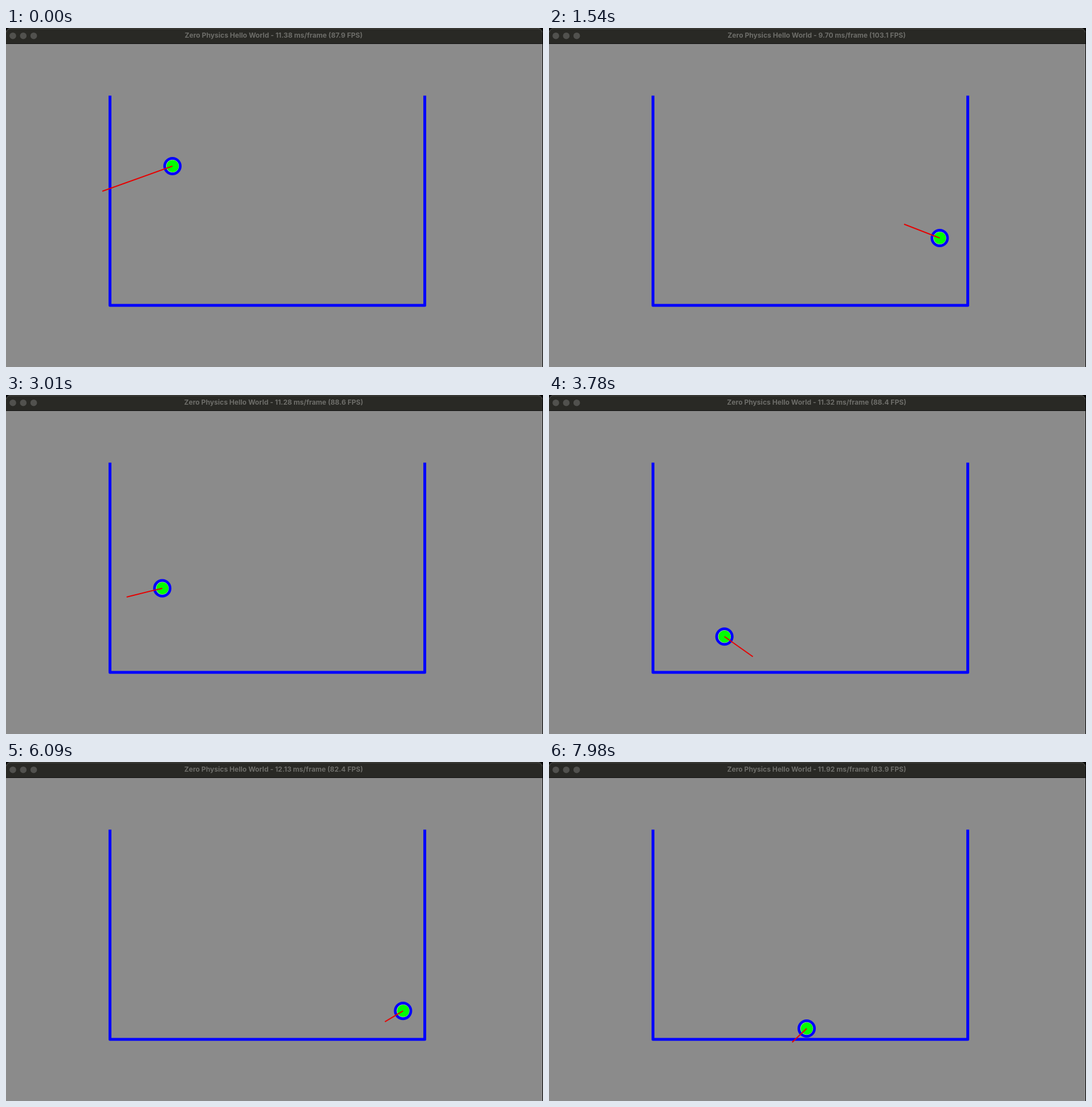
These frames come from a looping animation (942 by 594 pixels, 8 s). An HTML page:

```html
<!DOCTYPE html>
<html lang="en">
<head>
<meta charset="utf-8">
<title>Zero Physics</title>
<style>
  html, body { margin: 0; width: 100%; height: 100%; overflow: hidden; background: #000; }
  svg { display: block; width: 942px; height: 594px; }
  text { font: 700 12.1px Inter, sans-serif; fill: #6d6d69; }
</style>
</head>
<body>
<svg viewBox="0 0 942 594">
  <path d="M0 594V9Q0 0 9 0H932Q941 0 941 9V594Z" fill="#8b8b8b"/>
  <path d="M0 27V9Q0 0 9 0H932Q941 0 941 9V27Z" fill="#292925"/>
  <path d="M1 7Q2 1.5 9 1.5H932Q939 1.5 940 7" fill="none" stroke="#484845"/>
  <path d="M0 27.5H941" stroke="#10100f"/>
  <g fill="#51514e">
    <circle cx="12" cy="13.7" r="5.8"/>
    <circle cx="30.3" cy="13.7" r="5.8"/>
    <circle cx="48.6" cy="13.7" r="5.8"/>
  </g>
  <text id="title" x="469.5" y="17.4" text-anchor="middle"></text>
  <path d="M182.4 118.5V486H734.6V118.5" fill="none" stroke="#00f" stroke-width="5" stroke-linejoin="round"/>
  <g id="ball">
    <circle cx=".3" r="11" fill="#0f0" stroke="#b4d8b4" stroke-width=".8"/>
    <circle r="13.7" fill="none" stroke="#00f" stroke-width="4.7"/>
    <line id="velocity" stroke="#e60000" stroke-width="2"/>
  </g>
</svg>
<script>
const LOOP = 8000, STEP = 70;
const SPEED = 123, RESTITUTION = 0.798, GRAVITY = 6;

// Contacts with walls and floor: time, x, y. Free flight in between.
const contacts = [
  [0, 292, 242], [222, 189, 281], [960, 558, 467], [1427, 717, 381], [3275, 200, 361],
  [4072, 370, 472], [5950, 717, 425], [6380, 654, 467], [7980, 452, 467]
];

// Key readings of the frame timer: time, ms per frame.
const timings = [
  [0, 11.38], [910, 8.82], [2240, 9.264], [3780, 11.316], [4760, 10.43], [6090, 12.13], [7980, 11.92]
];

const byId = id => document.getElementById(id);
const title = byId("title"), ball = byId("ball"), velocity = byId("velocity");
const lerp = (a, b, s) => a + (b - a) * s;

function segmentAt(points, time) {
  const next = points.findIndex(p => p[0] > time);
  const i = (next < 0 ? points.length : next + 1) - 2;
  const from = points[Math.max(i, 0)], to = points[Math.max(i, 0) + 1];
  return { i, from, to, s: (time - from[0]) / (to[0] - from[0]) };
}

// Horizontal speed shrinks at every contact; gravity gives the arc between two of them.
function ballAt(time) {
  const { i, from: [, x0, y0], to: [, x1, y1], s } = segmentAt(contacts, time);
  const vx = Math.sign(x1 - x0) * SPEED * RESTITUTION ** i;
  const flight = (x1 - x0) / vx;
  return {
    x: lerp(x0, x1, s),
    y: lerp(y0, y1, s) - GRAVITY / 2 * flight ** 2 * s * (1 - s),
    vx,
    vy: (y1 - y0) / flight + GRAVITY * flight * (s - 0.5)
  };
}

function frameTimeAt(time) {
  const { from, to, s } = segmentAt(timings, time);
  const jitter = Math.sin(time * 0.18) * Math.sin(Math.PI * s);
  return lerp(from[1], to[1], s) + jitter;
}

function draw(time) {
  // The recording starts slowly: two steps per picture, and a late timer.
  const step = Math.floor(time / STEP);
  const shown = STEP * (step < 4 ? step - step % 2 : step);
  const { x, y, vx, vy } = ballAt(shown);
  ball.setAttribute("transform", `translate(${x} ${y})`);
  velocity.setAttribute("x2", vx);
  velocity.setAttribute("y2", vy);
  const ms = frameTimeAt(step < 4 ? 0 : shown);
  title.textContent =
    `Zero Physics Hello World - ${ms.toFixed(2)} ms/frame (${(1000 / ms).toFixed(1)} FPS)`;
}

const start = performance.now();
function tick() {
  draw((performance.now() - start) % LOOP);
  requestAnimationFrame(tick);
}
tick();
</script>
</body>
</html>
```
